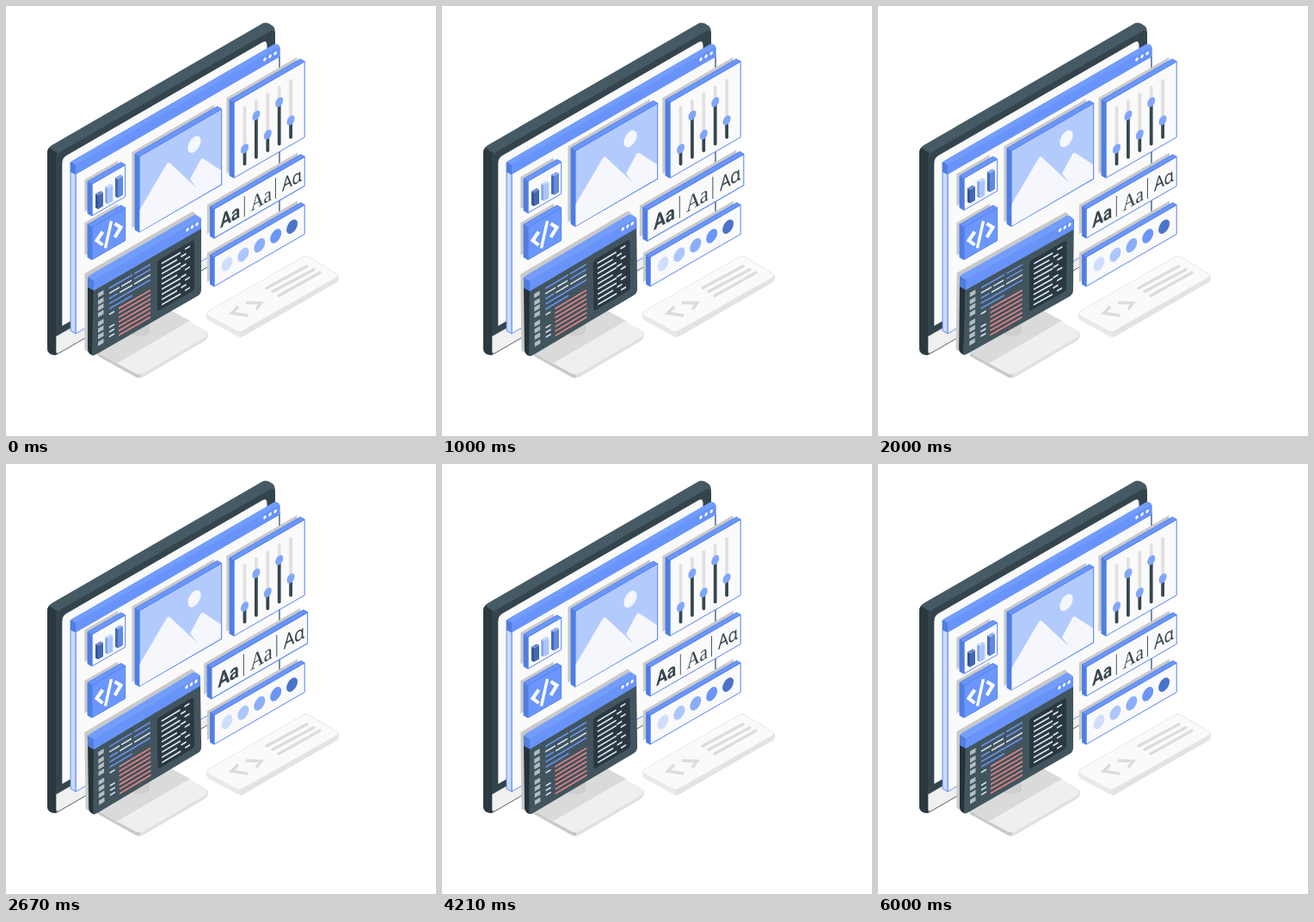
Animation, 500 px wide and 500 px high, one loop 6.04 s. Source, as an HTML page:

```html
<!DOCTYPE html>
<html lang="en">
<head>
<meta charset="utf-8">
<title>Isometric interface</title>
<style>
html, body { margin: 0; width: 100%; height: 100%; overflow: hidden; background: #fff; }
svg { display: block; width: 100vmin; height: 100vmin; }
</style>
</head>
<body>
<svg id="stage" viewBox="0 0 500 500" xmlns="http://www.w3.org/2000/svg"></svg>
<script>
const K = 0.577;
const BLUE = '#6b96fb', FRONT = '#6893fa', TOP = '#729dff', EDGE = '#4f7de0', LINE = '#5583f0';
const DARK = '#37474f';

const path = (d, fill, extra = '') => `<path d="${d}" fill="${fill}" ${extra}/>`;
const stroke = (d, color, w, extra = '') =>
  path(d, 'none', `stroke="${color}" stroke-width="${w}" ${extra}`);
const CAP = 'stroke-linecap="round"';

// Parallelogram standing on the left-facing isometric plane
const wall = (x, y, w, h) => `M${x} ${y}l${w} ${-w * K}v${h}l${-w} ${w * K}z`;

// Everything inside uses flat coordinates with its origin at the given point
const plane = (x, y, body) => `<g transform="matrix(1 ${-K} 0 1 ${x} ${y})">${body}</g>`;

// True isometric foreshortening, for circles and lettering
const iso = (x, y, body) => `<g transform="matrix(.866 -.5 0 1 ${x} ${y})">${body}</g>`;
const disc = (x, y, r, fill) => iso(x, y, `<circle r="${r}" fill="${fill}"/>`);

const shadow = (x, y, w, h, d) => path(wall(x - d - 3.7, y - d * K - 2.1, w, h), '#c9c9c9');

function slab(x, y, w, h, d, face) {
  const edge = `stroke="${LINE}" stroke-width="1" stroke-linejoin="round"`;
  return shadow(x, y, w, h, d)
    + path(wall(x, y, w, h), face, edge)
    + path(`M${x} ${y}l${-d} ${-d * K}v${h}l${d} ${d * K}z`, EDGE, edge)
    + path(`M${x} ${y}l${-d} ${-d * K}l${w} ${-w * K}l${d} ${d * K}z`, BLUE, edge);
}

const dots = (x, y, step) =>
  [0, 1, 2].map(i => disc(x + i * step, y - i * step * K, 2, '#fff')).join('');

function stand() {
  return path('M107 403V407L150 431Q156 434 162 430L231 389.500Q235 387 235 382V379Z', '#e0e0e0')
    + path('M107 403V407L150 431Q153 432.500 156 432.500V428L129 416Z', '#c9c9c9')
    + path('M107 403L150 427Q156 430 162 426L231 385.500Q238 381 231 376.500L188 352Z', '#efefef')
    + path('M107 403L129 415.500L214 366L188 352Z', '#dadada')
    + path('M146 350V382Q157 387 167 380V350Z', '#cfcfcf');
}

function card() {
  return path('M233 357V362Q233 364 236 366L269 384Q272 386 276 384L385 321Q387 319 387 316V313Z', '#e9e9e9')
    + path('M272 378V385.500L276 384L385 321Q387 319 387 313Z', '#e3e3e3')
    + path('M235 355L345 292Q349 290 353 292L384 311Q388 314 384 316L276 377Q272 380 268 378L235 360Q231 357 235 355Z',
      '#fafafa', 'stroke="#e4e4e4" stroke-width=".8"')
    + stroke('M270 349.500L262.500 357L281 360M279 345L296.500 345.500L291 353', '#dcdcdc', 3.6)
    + stroke('M303 328L350 302.500M310 332L358 306.500M317 337L365 310', '#dcdcdc', 3.2, CAP);
}

function monitor() {
  return path('M48 171.500Q48 165 53 162L297 21Q301 18.500 306 20.500L310 23Q313 25 313 32V258L58 406Q48 406 48 398Z', '#455a64')
    + path('M48 171.500Q48 167 50 165L60 171Q58 174 58 179V406Q48 405 48 398Z', '#2b383f')
    + path('M58 179Q58 173 64 169L306 30Q313 26 313 36V258L58 405Z', '#34444c')
    + path('M65.300 183Q65.300 177 70 174L298.500 42Q303.500 39.500 303.500 46V235L65.300 372Z', '#fafafa')
    + path('M58 384L313 237V258L61 404Q58 405 58 402Z', '#f0f0f0', `stroke="${DARK}" stroke-width=".7"`);
}

function browser() {
  const x = 81, y = 185, w = 237, h = 196;
  const edge = `stroke="${LINE}" stroke-width=".9"`;
  return path(wall(x, y, w, h), '#fafafa', edge)
    + path(`M${x} ${y}l-6 -3.5v${h}l6 3.5z`, '#cbdbff', edge)
    + path('M75 193V184Q75 181 78 179.500L311 45Q314 43.500 317 45.500L318.500 48V59L81 196Z', FRONT)
    + path('M76 181.500L78 179.500L311 45Q314 43.500 318 47L81 184.500Z', TOP)
    + path('M75 193V184Q75 182 76 181.500L81 184.500V196Z', EDGE)
    + stroke('M318 59V244', DARK, .9)
    + dots(301, 62, 6.1);
}

function sliders() {
  const knobs = [53, 22, 52, 22, 51];
  return slab(265, 112, 82.2, 88, 5, '#fafafa') + knobs.map((k, i) => {
    const x = 277.5 + i * 13.4, top = 118 - i * 7.75, y = top + k - 5;
    return stroke(`M${x} ${top}V${y}`, '#e0e0e0', 3.8, CAP)
      + stroke(`M${x} ${y}V${top + 65.5}`, DARK, 3.8, CAP)
      + disc(x, y, 5.2, '#80a6fb');
  }).join('');
}

function picture() {
  return slab(155, 175, 95.7, 88, 5, '#b3cafd')
    + path('M155.500 237L187 183.500Q189 180.500 191.500 183.500L222 212L214 201.500L226 179Q228 176 231 178.500L250 191V207L155.500 262.500Z', '#f5f7fd')
    + disc(219, 161, 8.8, '#f5f7fd');
}

function bar(x, y, h, front, side, top) {
  return path(`M${x} ${y}v${h}l3 1.700v${-h}z`, side)
    + path(wall(x + 3, y + 1.7, 6, h), front)
    + path(`M${x} ${y}l6 ${-6 * K}l3 1.700l-6 ${6 * K}z`, top);
}

function chart() {
  return slab(100, 207, 38.7, 37, 5, '#fafafa')
    + bar(104, 218.5, 16, '#4468b8', '#34529a', '#6b8ad0')
    + bar(115.3, 210, 18.5, '#a9c4fc', '#7da3f5', '#c6d8fd')
    + bar(127, 199.5, 22, '#6289dd', '#4468b8', '#8badf5');
}

function codeIcon() {
  return slab(100, 257, 38.7, 38, 5, BLUE)
    + stroke('M112.500 262.500L105.500 272.500L112.500 278M126.500 253L133.500 257.500L126.500 269', '#fff', 4.1)
    + stroke('M122.500 250L115.500 281.500', '#fff', 3.4);
}

function fonts() {
  const label = (x, y, size, family, weight, text) => iso(x, y,
    `<text font-size="${size}" font-weight="${weight}" font-family="${family}" fill="${DARK}" letter-spacing="-.5">${text}</text>`);
  return slab(242, 236, 105.2, 34, 4.5, '#fafafa')
    + label(249, 258.5, 22.5, 'Roboto, sans-serif', 600, 'Aa')
    + label(284.5, 239, 24.5, "'Liberation Serif', serif", 400, 'Aa')
    + label(321, 216, 21.5, "'Noto Sans', sans-serif", 400, 'A\u0251')
    + stroke('M277.300 221V245M313.500 200V224', DARK, .9);
}

function colours() {
  const fills = ['#d0defe', '#adc6fd', '#8baefa', '#6b95f7', '#4a74ca'];
  return slab(242, 292, 105.2, 34, 4.5, '#fafafa')
    + fills.map((c, i) => disc(257 + i * 18.9, 300 - i * 10.85, 7.5, c)).join('');
}

// One row of code: pairs of start and end
const row = (y, color, w, ...xs) => {
  let d = '';
  for (let i = 0; i < xs.length; i += 2) d += `M${xs[i]} ${y}H${xs[i + 1]}`;
  return stroke(d, color, w);
};

function editor() {
  const pale = '#dfe9ff', grey = '#b4bdc1', red = '#ee8585';
  let rows = '';
  for (const y of [21.5, 30, 37, 44.5, 55, 62.5, 70, 78]) rows += row(y, grey, 5, 5, 11.5);
  rows += row(20.5, BLUE, 1.7, 18, 45, 47, 66)
    + row(26.5, pale, 1.7, 18, 30, 32, 44) + row(26.5, BLUE, 1.7, 47, 66)
    + row(32.5, BLUE, 1.7, 18, 28) + row(32.5, pale, 1.7, 30, 45, 47, 66)
    + row(38.5, BLUE, 1.7, 18, 66)
    + row(44.5, BLUE, 1.7, 18, 45);
  for (let i = 0; i < 7; i++) rows += row(50.5 + i * 5.2, red, 1.8, 29, 66);
  for (const y of [51, 66, 71.5, 77]) rows += row(y, pale, 1.8, 18, 24);
  rows += '<rect x="74" y="21" width="43" height="59" rx="3" fill="#2b383f"/>';
  for (let i = 0; i < 9; i++) {
    const x = [106, 101.5][i % 2];
    rows += row(27 + i * 6, pale, 1.9, 79, i % 3 === 1 ? 97 : 101)
      + row(26 + i * 6, pale, 1.9, x, x + 6);
  }
  return path('M91.500 311L217 239L221 242V330L95 402L91.500 400Z', '#c9c9c9')
    + path('M95 315L102 319V406.500Q95 405 95 399Z', '#263238')
    + path('M102 319L227 247V330Q227 334.500 223 337L106 404.500Q102 407 100 406Z', '#42555e')
    + path('M102 319L227 247V259L102 331Z', FRONT)
    + path('M95 315L102 319V331L95 327Z', EDGE)
    + path('M95 315L98 312.500L216 244.500Q220 242 223 244L227 247L102 319Z', TOP)
    + dots(211, 260, 5.5)
    + plane(102, 318, rows);
}

const group = (id, body) => `<g id="${id}">${body}</g>`;
const stage = document.getElementById('stage');
stage.innerHTML = stand() + card() + monitor() + browser() + sliders()
  + group('picture', picture()) + group('chart', chart()) + codeIcon()
  + group('fonts', fonts()) + colours() + group('editor', editor());

// Linear interpolation through [time, value] steps
function track(steps, t) {
  const n = steps.findIndex(s => s[0] > t);
  if (n < 0) return steps[steps.length - 1][1];
  const [t0, a] = steps[n - 1], [t1, b] = steps[n];
  return a + (b - a) * (t - t0) / (t1 - t0);
}

const LOOP = 6040;
const FLOAT = [[0, 0], [750, -10], [1500, 0]];
const SLOW = [[0, 0], [3000, -10], [6000, 0]];
const SWAY = [[0, 0], [375, 1], [1125, -1], [1500, 0]];
const PULSE = [[0, 1], [750, 1.1], [1500, 1], [2200, 1], [2950, 1.1], [3700, 1]];

const move = (id, value) => document.getElementById(id).setAttribute('transform', value);

function draw(t) {
  const beat = t < 6000 ? t % 1500 : 0;
  move('picture', `translate(0 ${track(FLOAT, beat)})`);
  move('chart', `translate(0 ${track(SLOW, t)})`);
  move('editor', `rotate(${track(SWAY, beat)} 160 323)`);
  move('fonts', `translate(292.5 221) scale(${track(PULSE, t)}) translate(-292.5 -221)`);
}

const start = performance.now();
function tick() {
  draw((performance.now() - start) % LOOP);
  requestAnimationFrame(tick);
}
tick();
</script>
</body>
</html>
```
